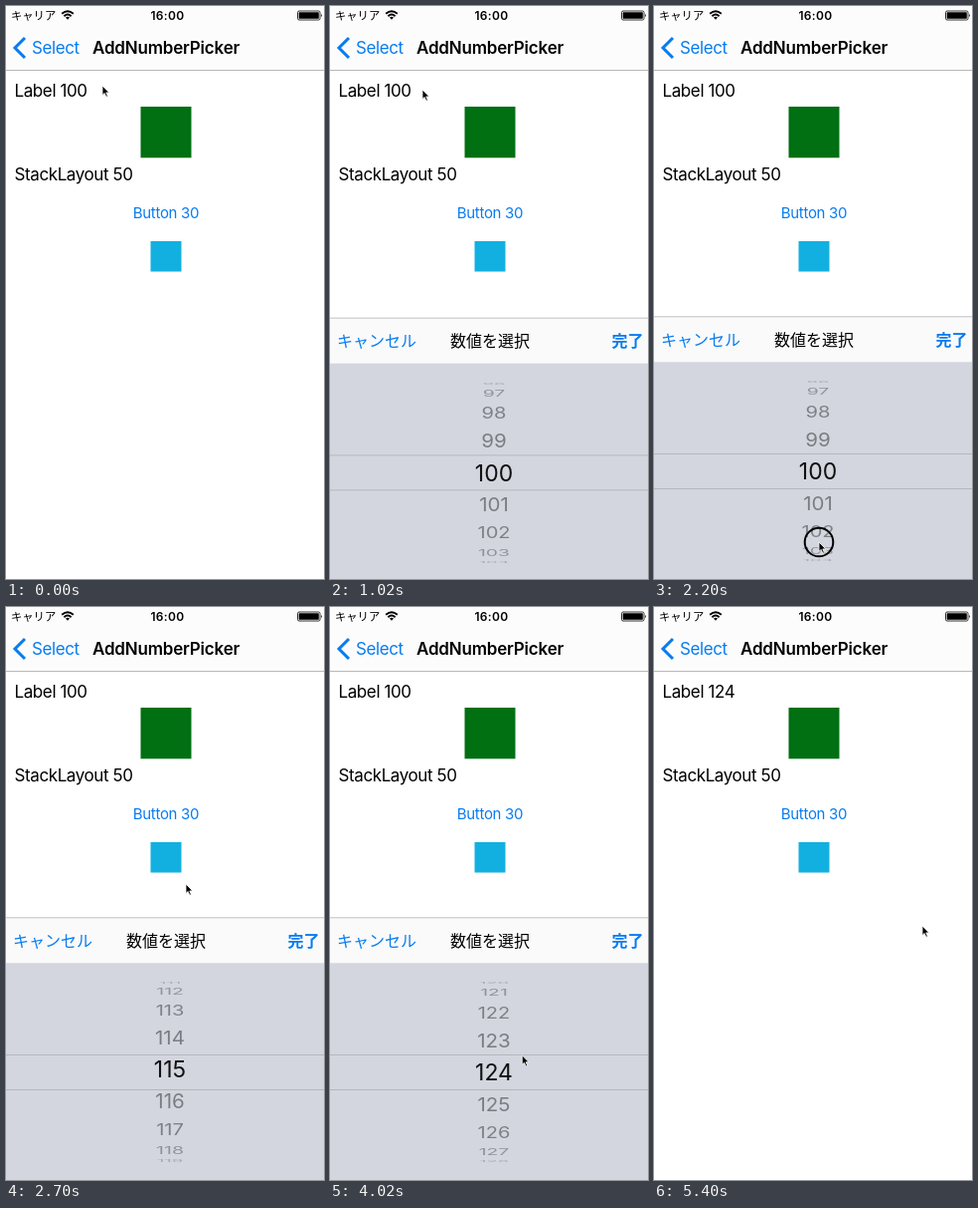
Recreate the animation shown at these times as an HTML page. Size 320 by 575 pixels, loop 5.42 s.

```html
<!DOCTYPE html>
<html lang="ja">
<head>
<meta charset="utf-8">
<title>Number picker</title>
<style>
  html, body { margin: 0; width: 100%; height: 100%; overflow: hidden; background: #fff; }
  svg { display: block; width: 100vw; height: 100vh; }
  text { font-family: Inter, Roboto, "Noto Sans CJK JP", "Noto Sans CJK", sans-serif; font-size: 17px; letter-spacing: -.4px; }
  .ja { font-family: "Noto Sans CJK JP", "Noto Sans CJK", sans-serif; font-size: 16px; letter-spacing: 0; }
  .blue { fill: #087cf0; }
  .wheel text { text-anchor: middle; letter-spacing: 0; }
</style>
</head>
<body>
<svg viewBox="0 0 320 575">
  <defs>
    <clipPath id="outside"><path d="M0 358H320V450H0zM0 484H320V575H0z"/></clipPath>
    <clipPath id="inside"><path d="M0 450H320V484H0z"/></clipPath>
  </defs>
  <rect width="320" height="575" fill="#fff"/>

  <rect width="320" height="64" fill="#fcfcfc"/>
  <path d="M0 64.5H320" stroke="#b8b8b8"/>
  <text class="ja" x="5" y="13.5" style="font-size:11.3px">キャリア</text>
  <g fill="none" stroke="#000" stroke-width="1.9">
    <path d="M56.2 7.8Q62 2.6 67.8 7.8M58.4 10.2Q62 7 65.6 10.2"/>
    <path d="M60 11.6Q62 9.8 64 11.6L62 13.8z" fill="#000" stroke="none"/>
  </g>
  <text x="145.5" y="13.8" font-weight="600" style="font-size:12px;letter-spacing:.3px">16:00</text>
  <rect x="293.5" y="5" width="22.5" height="9" rx="1.5" fill="none" stroke="#000" stroke-width=".8"/>
  <rect x="294.7" y="6.2" width="20.1" height="6.6" rx=".5"/>
  <path d="M317 7.8Q318.8 9.5 317 11.2z"/>
  <path d="M19 32L9 42L19 52" fill="none" stroke="#087cf0" stroke-width="3"/>
  <text class="blue" x="26" y="48">Select</text>
  <text x="87" y="48" font-weight="600" style="letter-spacing:-.2px">AddNumberPicker</text>

  <text id="label" x="8.5" y="90.5"></text>
  <rect x="135.5" y="101" width="51" height="51.3" fill="#007013"/>
  <text x="8.5" y="174.5">StackLayout 50</text>
  <text class="blue" x="161" y="213.3" text-anchor="middle" style="font-size:15px;letter-spacing:-.3px">Button 30</text>
  <rect x="145.5" y="236" width="31" height="30.5" fill="#12b0e0"/>

  <g id="picker">
    <rect y="312" width="320" height="46" fill="#fafafa"/>
    <path d="M0 311.8H320" stroke="#bfbfc2"/>
    <text class="ja blue" x="7" y="340.7">キャンセル</text>
    <text class="ja" x="121" y="340.7">数値を選択</text>
    <text class="ja blue" id="done" x="283.5" y="340.7" font-weight="700">完了</text>
    <rect y="357.3" width="320" height="218" fill="#d3d6de"/>
    <path d="M0 449.5H320M0 484.5H320" stroke="#b4b7bd"/>
    <g class="wheel" id="dim" clip-path="url(#outside)" fill="#7a7d82"></g>
    <g class="wheel" id="lit" clip-path="url(#inside)" fill="#111"></g>
  </g>

  <g id="cursor">
    <circle id="press" r="14.3" fill="none" stroke="#000" stroke-width="2"/>
    <path d="M0 0V9.4L2.2 7.5L3.8 11.2L5.4 10.5L3.8 6.9H6.8z" fill="#000" stroke="#fff" stroke-width=".8"/>
  </g>
</svg>
<script>
const LOOP = 5420, TRAVEL = 263;
const OPEN = 537, CLOSE = 4860;
const FLICK = 2240, RELEASE = 2420, CATCH = 3300, SNAP = 3460;
const RADIUS = 90, STEP = 20.9 * Math.PI / 180, CENTER = 467;
const PRESSES = [[420, 530], [2110, RELEASE], [3280, SNAP], [4680, 4810]];
// time, x, y
const CURSOR_PATH = [
  [0, 97, 80], [80, 97, 80], [360, 93, 84], [1140, 93, 84], [1660, 160, 555],
  [2000, 166, 541], [2200, 166, 538], [FLICK, 166, 538], [RELEASE, 180, 290],
  [2700, 181, 278], [2820, 181, 278], [3240, 179, 457], [SNAP, 179, 457],
  [3800, 190, 454], [3960, 190, 454], [4500, 283, 335], [5060, 283, 335],
  [5360, 270, 320], [LOOP, 270, 320]
];

const $ = id => document.getElementById(id);
const clamp = (v, lo = 0, hi = 1) => Math.min(hi, Math.max(lo, v));
const smooth = v => v * v * (3 - 2 * v);
const span = (t, from, to) => clamp((t - from) / (to - from));
const within = (t, [from, to]) => t >= from && t < to;

// Critically damped spring from 0 to 1.
function spring(ms) {
  const x = Math.max(0, ms) * .0153;
  return 1 - (1 + x) * Math.exp(-x);
}

function cursorAt(t) {
  const i = CURSOR_PATH.findIndex(key => key[0] > t);
  const [t0, x0, y0] = CURSOR_PATH[i - 1], [t1, x1, y1] = CURSOR_PATH[i];
  const k = smooth(span(t, t0, t1));
  return [x0 + (x1 - x0) * k, y0 + (y1 - y0) * k];
}

// Drag, momentum, then a catch that settles on the nearest row.
function wheelAt(t) {
  if (t < RELEASE) return 100 + 8 * smooth(span(t, FLICK, RELEASE));
  if (t < SNAP) return 108 + 25 * (1 - Math.exp(-(Math.min(t, CATCH) - RELEASE) / 842));
  return 124 + (wheelAt(CATCH) - 124) * (1 - spring(t - SNAP));
}

function makeRows(id, size) {
  return Array.from({ length: 11 }, () => {
    const row = document.createElementNS("http://www.w3.org/2000/svg", "text");
    row.style.fontSize = size + "px";
    row.setAttribute("y", size * .363);
    return $(id).appendChild(row);
  });
}
const layers = [makeRows("dim", 20.7), makeRows("lit", 23)];

function drawWheel(position) {
  const first = Math.round(position) - 5;
  for (const rows of layers) rows.forEach((row, i) => {
    const angle = (first + i - position) * STEP;
    const depth = Math.cos(angle);
    row.style.display = depth > .03 && Math.abs(angle) < 1.55 ? "" : "none";
    row.textContent = first + i;
    row.setAttribute("opacity", clamp(.4 + .75 * depth));
    row.setAttribute("transform",
      `translate(165 ${CENTER + RADIUS * Math.sin(angle)}) scale(${1 - .12 * (1 - depth)} ${depth})`);
  });
}

function render(t) {
  const offset = TRAVEL * (1 - spring(t - OPEN) + spring(t - CLOSE));
  $("picker").setAttribute("transform", `translate(0 ${offset})`);
  $("picker").style.display = offset > 262 ? "none" : "";
  drawWheel(wheelAt(t));

  $("label").textContent = "Label " + (t < CLOSE ? 100 : 124);
  $("done").setAttribute("opacity", t < 4690 ? 1 : .25 + .75 * span(t, 4830, 5080));

  const [x, y] = cursorAt(t);
  $("cursor").setAttribute("transform", `translate(${x} ${y})`);
  $("press").style.display = PRESSES.some(p => within(t, p)) ? "" : "none";
}

const start = performance.now();
function tick() {
  render((performance.now() - start) % LOOP);
  requestAnimationFrame(tick);
}
tick();
</script>
</body>
</html>
```
